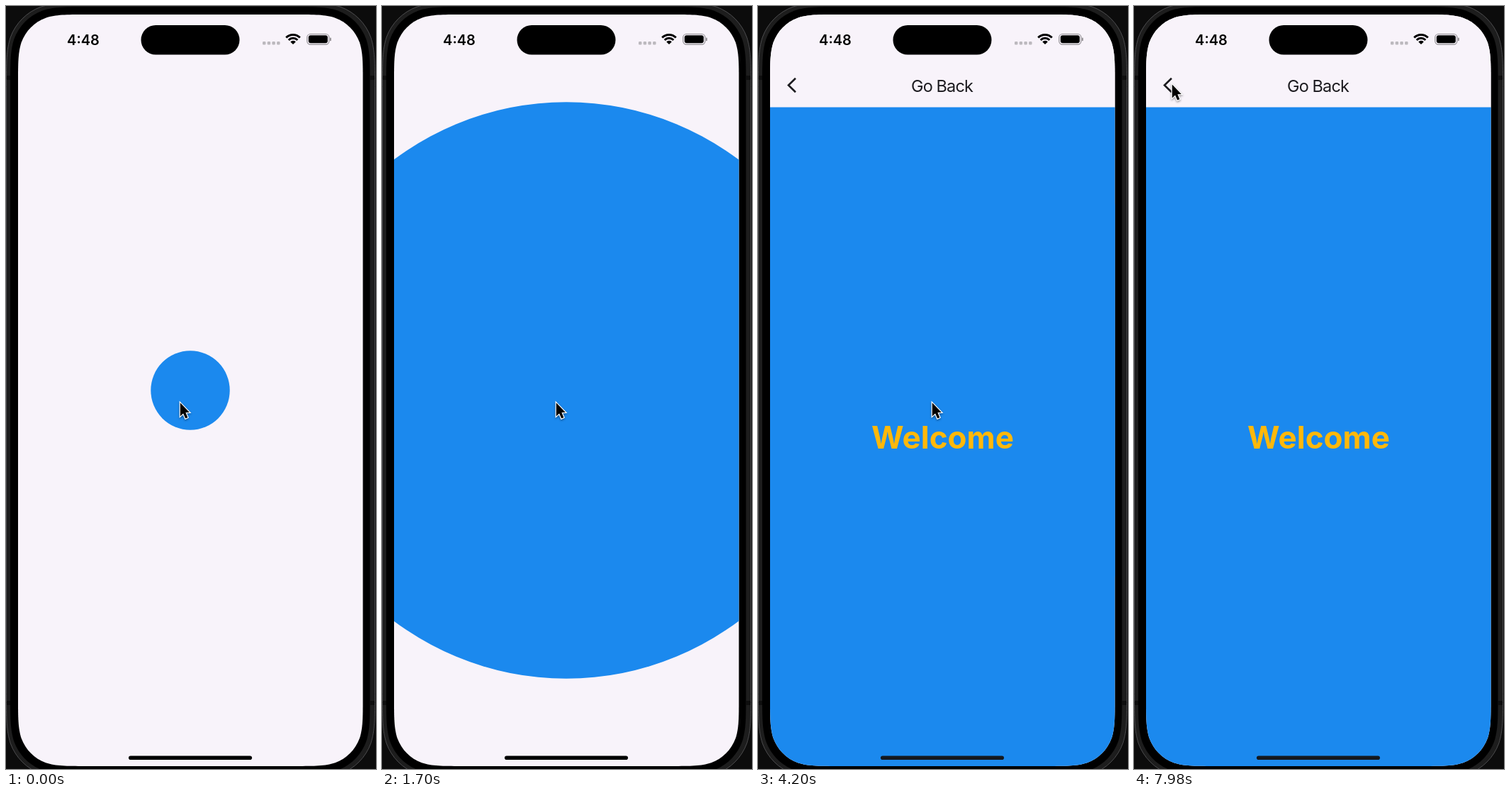
These frames come from a looping animation (522x1074 px, 8 s). An HTML page with a canvas:

```html
<!DOCTYPE html>
<html lang="en">
<head>
<meta charset="utf-8">
<title>Expanding circle</title>
<style>
html, body { margin: 0; width: 100%; height: 100%; overflow: hidden; background: #0c0c0c; }
canvas { display: block; width: 522px; height: 1074px; }
</style>
</head>
<body>
<canvas id="stage" width="522" height="1074"></canvas>
<script>
const W = 522, H = 1074, LOOP = 8000;
const BLUE = '#1b89ee', PALE = '#f8f3fa', INK = '#1c1b1f', AMBER = '#ffb80a';
const SCREEN = { x: 17, y: 12, w: 486.5, h: 1058 };
const ctx = document.getElementById('stage').getContext('2d');

const clamp = v => Math.max(0, Math.min(1, v));
const smooth = v => v * v * (3 - 2 * v);

// Rounded rectangle with continuous-curvature corners.
function squircle(x, y, w, h, r) {
  const p = new Path2D();
  const corners = [[x, y, 1, 1], [x + w, y, -1, 1], [x + w, y + h, -1, -1], [x, y + h, 1, -1]];
  const half = [[0, 1.5287], [0, 1.0885], [0, 0.8684], [0.0749, 0.6315], [0.1691, 0.3728]];
  const pts = half.concat(half.slice().reverse().map(([a, b]) => [b, a]));
  corners.forEach(([cx, cy, sx, sy], i) => {
    const seq = i % 2 ? pts.slice().reverse() : pts;
    const q = seq.map(([a, b]) => [cx + sx * a * r, cy + sy * b * r]);
    p.lineTo(...q[0]);
    for (let k = 1; k < 10; k += 3) p.bezierCurveTo(...q[k], ...q[k + 1], ...q[k + 2]);
  });
  p.closePath();
  return p;
}

function pill(c, x, y, w, h, r, color) {
  c.fillStyle = color;
  c.beginPath();
  c.roundRect(x, y, w, h, r);
  c.fill();
}

function label(c, text, x, y, font, color, spacing = 0) {
  c.font = font + ' Inter, "Liberation Sans", sans-serif';
  c.letterSpacing = spacing + 'px';
  c.textAlign = 'center';
  c.fillStyle = color;
  c.fillText(text, x, y);
}

function makeLayer(draw) {
  const layer = document.createElement('canvas');
  layer.width = W;
  layer.height = H;
  draw(layer.getContext('2d'));
  return layer;
}

const screenPath = squircle(SCREEN.x, SCREEN.y, SCREEN.w, SCREEN.h, 62);

const body = makeLayer(c => {
  c.fillStyle = '#0c0c0c';
  c.fillRect(0, 0, W, H);
  const shell = squircle(0.5, -4.5, 520, 1091, 77);
  c.fillStyle = '#1d1d1d';
  c.fill(shell);
  c.fillStyle = '#0e0e0e';
  for (const y of [98, 978]) {
    c.fillRect(0, y, 6, 6);
    c.fillRect(514, y, 7, 6);
  }
  c.strokeStyle = '#4c4c4e';
  c.stroke(shell);
  c.fillStyle = '#000';
  c.fill(squircle(6, 1, 507.5, 1080, 72));
});

const page = makeLayer(c => {
  c.fillStyle = BLUE;
  c.fillRect(0, 0, W, H);
  c.fillStyle = PALE;
  c.fillRect(0, 0, W, 142.5);
  c.strokeStyle = INK;
  c.lineWidth = 2.6;
  c.beginPath();
  c.moveTo(53, 101.8);
  c.lineTo(43, 111.5);
  c.lineTo(53, 121.2);
  c.stroke();
  label(c, 'Go Back', 259.5, 120.5, '400 23.5px', INK, -0.9);
  label(c, 'Welcome', 260.5, 623, '700 44px', AMBER);
});

const status = makeLayer(c => {
  pill(c, 190.5, 27, 139, 41.5, 20.7, '#000');
  label(c, '4:48', 109, 54.5, '600 20px', '#000');
  for (let i = 0; i < 4; i++) pill(c, 362 + i * 6.7, 50, 4.4, 4.4, 1.2, 'rgba(0,0,0,.24)');

  const up = -Math.PI / 2, spread = 0.8;
  const wave = (r, width) => {
    c.lineWidth = width;
    c.beginPath();
    c.arc(405, 54, r, up - spread, up + spread);
    c.stroke();
  };
  c.strokeStyle = '#000';
  wave(13.6, 3);
  wave(8.7, 3);
  wave(2.6, 5.2);

  c.strokeStyle = 'rgba(0,0,0,.42)';
  c.lineWidth = 1.2;
  c.beginPath();
  c.roundRect(424.8, 39.5, 31, 14.6, 4.6);
  c.stroke();
  pill(c, 426.8, 41.3, 27, 11, 3, '#000');
  pill(c, 457, 44.6, 1.7, 4.6, 0.8, 'rgba(0,0,0,.45)');
});

function radiusAt(t) {
  const grow = 55.5 + 0.21866 * t - 7.5e-6 * t * t;
  const shrink = 526 - 0.2 * (t - 3360);
  return Math.max(55.5, Math.min(grow, shrink));
}

function pointerAt(t) {
  const s = smooth(clamp((t - 5000) / 1200)), u = 1 - s;
  const mix = (a, b, c) => u * u * a + 2 * u * s * b + s * s * c;
  return [mix(245, 171, 53), mix(557, 154, 109)];
}

const arrow = new Path2D('M0 0V18.8L4.3 14.9L7.4 22L10.6 20.6L7.6 13.7L13 13.3Z');

function drawPointer(x, y) {
  ctx.save();
  ctx.translate(x + 0.8, y + 1.6);
  ctx.lineWidth = 2.4;
  ctx.strokeStyle = '#fff';
  ctx.shadowColor = 'rgba(0,0,0,.4)';
  ctx.shadowBlur = 3;
  ctx.shadowOffsetY = 1.5;
  ctx.stroke(arrow);
  ctx.shadowColor = 'transparent';
  ctx.fillStyle = '#000';
  ctx.fill(arrow);
  ctx.restore();
}

function draw(t) {
  ctx.drawImage(body, 0, 0);
  ctx.save();
  ctx.clip(screenPath);
  ctx.fillStyle = PALE;
  ctx.fillRect(0, 0, W, H);
  ctx.fillStyle = BLUE;
  ctx.beginPath();
  ctx.arc(260, 541, radiusAt(t), 0, Math.PI * 2);
  ctx.fill();
  ctx.globalAlpha = clamp((t - 3156) / 300);
  ctx.drawImage(page, 0, 0);
  ctx.globalAlpha = 1;
  ctx.drawImage(status, 0, 0);
  pill(ctx, 173, 1055.5, 174, 5.6, 2.8, t < 2300 ? '#000' : '#14181e');
  ctx.restore();
  drawPointer(...pointerAt(t));
}

const start = performance.now();
function tick() {
  draw((performance.now() - start) % LOOP);
  requestAnimationFrame(tick);
}
tick();
</script>
</body>
</html>
```
